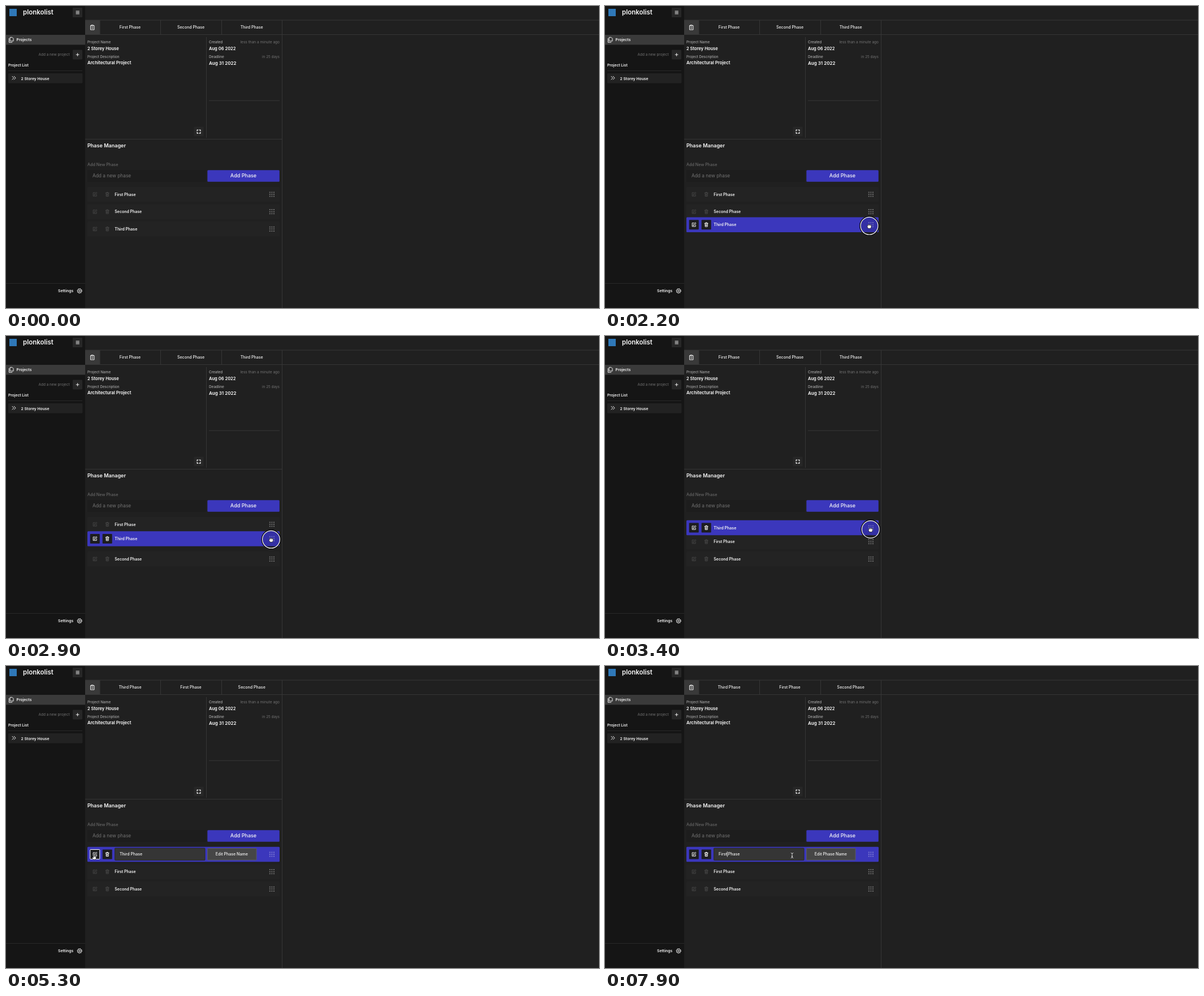
An HTML page that plays this animation: 1049 px wide and 534 px high, repeating every 8 s.

```html
<!DOCTYPE html>
<html lang="en">
<head>
<meta charset="utf-8">
<title>Phase manager</title>
<style>
  html, body { margin: 0; width: 100%; height: 100%; overflow: hidden; background: #202020; }
  svg { display: block; width: 1049px; height: 534px; }
  text { font: 500 7.05px Inter, "Open Sans", sans-serif; fill: #f6f6f6; white-space: pre; }
  .mid { text-anchor: middle; }
  .end { text-anchor: end; }
  .bold { font-weight: 600; }
  .label { font-size: 6.4px; fill: #a6a6a6; }
  .dim { font-size: 6.4px; font-weight: 400; fill: #727272; }
  .value { font-size: 7.55px; font-weight: 600; fill: #fff; }
  .side { font-size: 6.8px; font-weight: 600; }
  .line { fill: none; stroke: #363636; }
  .faint { fill: none; stroke: #292929; }
  .box { fill: #272727; }
  .icon { fill: none; stroke: currentColor; stroke-width: 1; stroke-linecap: round; stroke-linejoin: round; color: #eee; }
  .row .bg { fill: #232323; }
  .row .btn { fill: transparent; }
  .row .icon { color: #454545; }
  .row .grip { fill: none; stroke: #6a6a6a; stroke-width: 2; stroke-dasharray: 2 1.6; }
  .row.on .bg { fill: #3b37bc; }
  .row.on .btn { fill: #1d1d1f; }
  .row.on .icon { color: #f2f2f2; }
  .row.on .grip { stroke: #7774cf; }
  .cursor { fill: #fff; stroke: #111; stroke-width: .7; stroke-linejoin: round; }
</style>
</head>
<body>
<svg viewBox="0 0 1049 534">
  <defs>
    <g id="pencil">
      <path d="M0 -3H-3V3.2H3V.4"/>
      <path d="M-1.2 1.3L-.9 -.4L2.5 -3.7L3.8 -2.5L.5 .9Z"/>
    </g>
    <path id="trash" d="M-3 -2.4H3M-1.2 -2.4V-3.6H1.2V-2.4M-2.3 -2.2L-2 3.5H2L2.3 -2.2M-.7 -.6V2M.7 -.6V2"/>
    <path id="beam" d="M-2 -4.5Q0 -4.5 0 -3Q0 -4.5 2 -4.5M0 -3V3M-2 4.5Q0 4.5 0 3Q0 4.5 2 4.5M-1 1.5H1"/>
  </defs>

  <rect width="1049" height="534" fill="#202020"/>
  <rect width="140" height="534" fill="#151515"/>

  <!-- sidebar -->
  <rect x="6" y="5" width="13" height="13" fill="#2f78b8"/>
  <text x="30" y="15" style="font-size:11.5px;font-weight:600">plonkolist</text>
  <rect class="box" x="118" y="3" width="17" height="17" rx="1"/>
  <path class="icon" d="M124 9.2h5.4M124 11.5h5.4M124 13.8h5.4"/>
  <rect y="51" width="140" height="17.5" fill="#3a3a3a"/>
  <g class="icon">
    <path d="M7.6 55.4H11L13 57.4V62H7.6Z"/>
    <path d="M5.4 57.4V64.3H10.8"/>
  </g>
  <text class="side" x="18.5" y="62">Projects</text>
  <text class="dim end" x="112.5" y="88.3">Add a new project</text>
  <rect class="box" x="118" y="77.5" width="17" height="17" rx="1"/>
  <path class="icon" d="M124.2 86h4.8M126.6 83.6v4.8"/>
  <text class="side" x="4" y="107" style="font-size:6.65px">Project List</text>
  <path class="faint" d="M4 114.5H135M0 490.5H140"/>
  <rect x="4" y="119" width="131.5" height="17.5" rx="1" fill="#222"/>
  <path class="icon" d="M11 124.3l2.8 2.9l-2.8 2.9M14.3 124.3l2.8 2.9l-2.8 2.9"/>
  <text class="side" x="26.5" y="130.6">2 Storey House</text>
  <text class="side" x="92" y="506.2">Settings</text>
  <g class="icon">
    <circle cx="130.2" cy="503.8" r="3.5"/>
    <circle cx="130.2" cy="503.8" r="1.3"/>
    <circle cx="130.2" cy="503.8" r="4.2" stroke-dasharray="1.3 2" stroke-linecap="butt"/>
  </g>

  <!-- tabs and dividers -->
  <rect x="140" y="25" width="26" height="25.5" fill="#393939"/>
  <g class="icon">
    <path d="M151 34.5H149.5V42H156V34.5H154.5M151.3 33.7H154.2V35.3H151.3Z"/>
    <path d="M151.3 37.8h2.8M151.3 39.8h2.8" stroke-width=".8"/>
  </g>
  <path class="line" d="M140 25H1049M140 50.5H1049M166 25V50M273.5 25V50M381.5 25V50M488.5 25V534M140 235.5H488M354.5 55V233M359 167.3H484"/>
  <g id="tabs">
    <text class="mid" x="219.5" y="40.2"></text>
    <text class="mid" x="327" y="40.2"></text>
    <text class="mid" x="434.7" y="40.2"></text>
  </g>

  <!-- project details -->
  <text class="label" x="144" y="66.4">Project Name</text>
  <text class="value" x="144" y="77.5">2 Storey House</text>
  <text class="label" x="144" y="91.8" style="font-size:6.2px">Project Description</text>
  <text class="value" x="144" y="102.7" style="font-size:7.8px">Architectural Project</text>
  <text class="label" x="359" y="66.4">Created</text>
  <text class="dim end" x="484" y="66.4" style="font-size:6.55px">less than a minute ago</text>
  <text class="value" x="359" y="77.5">Aug 06 2022</text>
  <text class="label" x="359" y="91.8">Deadline</text>
  <text class="dim end" x="484" y="91.8">in 25 days</text>
  <text class="value" x="359" y="103.7" style="font-size:8px">Aug 31 2022</text>
  <rect class="box" x="332.5" y="213.5" width="17" height="17" rx="1"/>
  <path class="icon" stroke-linecap="butt" style="stroke-width:1.3" d="M338.1 220.9V219.2H339.8M342.2 219.2H343.9V220.9M343.9 223.3V225H342.2M339.8 225H338.1V223.3"/>

  <!-- phase form -->
  <text class="bold" x="144" y="249.6" style="font-size:9.05px">Phase Manager</text>
  <text x="144" y="283" style="font-size:7.2px;fill:#686868">Add New Phase</text>
  <rect x="144" y="290" width="210" height="21" rx="1" fill="#1d1d1d"/>
  <text x="153" y="302.9" style="font-size:8.35px;font-weight:400;fill:#727272">Add a new phase</text>
  <rect x="356.3" y="290.3" width="127.5" height="20.5" rx="1.5" fill="#3b37bc"/>
  <text class="mid" x="420" y="303.4" style="font-size:9px">Add Phase</text>

  <g id="rows"></g>

  <g id="editor">
    <rect x="192.5" y="322" width="159.5" height="21.5" rx="1" fill="#353535" stroke="#29292f"/>
    <rect x="356.5" y="322.5" width="86.5" height="20.5" rx="1" fill="#464646" stroke="#5b5b5b"/>
    <text class="mid" x="399.3" y="335.2">Edit Phase Name</text>
    <rect id="mark" x="201" y="328" height="9.5" fill="#5d96c9"/>
    <text id="field" x="201" y="335.2"></text>
    <rect id="caret" y="328" width=".8" height="9.5" fill="#fff"/>
  </g>

  <g id="pointer">
    <g id="ring" fill="none">
      <circle r="16.2" stroke="#0c0c10" stroke-width="2.4" fill="#000" fill-opacity=".12"/>
      <circle r="15.4" stroke="#fff" stroke-width="1.2"/>
    </g>
    <path class="cursor" data-kind="arrow" d="M0 0V9L2.2 7L3.7 10.3L5.1 9.7L3.6 6.5H6.4Z"/>
    <path class="cursor" data-kind="open" d="M-2 4.8L-4 1.2Q-4.3 .1 -3.2 .3L-2.3 1.2L-3 -2.2Q-2.4 -3.3 -1.7 -2.3L-1 -.6V-3.5Q-.3 -4.6 .4 -3.5L.6 -.6L1.3 -3Q2.2 -3.8 2.5 -2.7L2.2 0L3 -1.5Q4 -2 3.9 -.8L2.8 4.8Z"/>
    <path class="cursor" data-kind="grab" d="M-2 4.5L-3.7 1.5Q-4 0 -2.8 .3V-1.6Q-2 -2.8 -1.2 -1.9Q-.4 -3 .5 -1.9Q1.5 -2.8 2.1 -1.5Q3.4 -2 3.5 -.6V1.8L2.5 4.5ZM-1.2 -1.9V-.3M.5 -1.9V-.3M2.1 -1.5V-.3"/>
    <path class="cursor" data-kind="hand" d="M-1.5 5.2L-3.7 2Q-3.7 .7 -2.6 1.2L-1.5 2V-3Q-.8 -4.2 0 -3V0Q.8 -.7 1.3 .2Q2.1 -.4 2.6 .6Q3.6 .2 3.7 1.4L2.9 5.2Z"/>
    <g data-kind="beam" fill="none" stroke-linecap="round">
      <use href="#beam" stroke="#111" stroke-width="2"/>
      <use href="#beam" stroke="#fff" stroke-width=".9"/>
    </g>
  </g>
</svg>
<script>
const LOOP = 8000, STEP = 100;
const $ = id => document.getElementById(id);
const show = (el, on) => { el.style.display = on ? '' : 'none'; };
const within = (t, a, b) => t >= a && t < b;

// Linear value on a list of [time, ...values].
function track(points, t) {
  const i = points.findIndex(p => p[0] > t);
  if (i < 0) return points[points.length - 1].slice(1);
  if (i === 0) return points[0].slice(1);
  const a = points[i - 1], b = points[i];
  const k = (t - a[0]) / (b[0] - a[0]);
  return a.slice(1).map((v, j) => v + (b[j + 1] - v) * k);
}

// Latest entry of a list of [time, value].
const latest = (list, t) => list.filter(e => e[0] <= t).pop()[1];

const SLOTS = [333, 363.7, 394.3];
const rows = [
  { name: 'First Phase', y: [[3100, SLOTS[0]], [3300, SLOTS[1]]] },
  { name: 'Second Phase', y: [[2700, SLOTS[1]], [2900, SLOTS[2]]] },
  { name: 'Third Phase', y: [[1500, SLOTS[2]], [2000, 395], [2600, 370], [3400, 339], [3700, 336], [3800, SLOTS[0]]] }
];

const path = [
  [300, 118, 432], [500, 260, 400], [700, 470, 396], [900, 470, 430], [1100, 470, 430],
  [1300, 465, 406], [1500, 466, 397], [2000, 467, 398], [2600, 468.5, 370.5],
  [3400, 469.8, 342], [3800, 470, 336], [3900, 470, 336], [4300, 156, 337],
  [5500, 156, 337], [5800, 214, 331.5], [7700, 214, 331.5], [7800, 250, 334], [7900, 331, 335]
];
const kinds = [[0, ''], [300, 'arrow'], [1300, 'open'], [1500, 'grab'], [3800, 'open'],
  [4000, 'arrow'], [4300, 'hand'], [5700, 'beam']];
const typed = [[0, 'Third'], [7000, 'F'], [7200, 'Fi'], [7400, 'Fir'], [7500, 'Firs'], [7700, 'First']];

$('rows').innerHTML = rows.map(r => `
  <g class="row">
    <rect class="bg" x="144" y="-13.2" width="340" height="26.5" rx="1.5"/>
    <rect class="btn" x="148.8" y="-8.5" width="17" height="17" rx="1"/>
    <rect class="btn" x="170.7" y="-8.5" width="17" height="17" rx="1"/>
    <use class="icon" href="#pencil" x="157.2"/>
    <use class="icon" href="#trash" x="179.2"/>
    <text class="bold" x="192.3" y="2.6" style="font-size:6.95px">${r.name}</text>
    <path class="grip" d="M465.8 -3.6h9.2M465.8 0h9.2M465.8 3.6h9.2"/>
  </g>`).join('');

const rowEls = [...document.querySelectorAll('.row')];
const third = rowEls[2];
const editBtn = third.querySelector('.btn');
const tabEls = [...$('tabs').children];
const cursors = [...document.querySelectorAll('[data-kind]')];

function draw(t) {
  rows.forEach((r, i) => rowEls[i].setAttribute('transform', `translate(0 ${track(r.y, t)[0]})`));
  third.classList.toggle('on', within(t, 500, 800) || t >= 1400);

  const order = t < 3900 ? [0, 1, 2] : [2, 0, 1];
  tabEls.forEach((el, i) => { el.textContent = rows[order[i]].name; });

  const editing = t >= 4800;
  show($('editor'), editing);
  show(third.querySelector('text'), !editing);
  editBtn.style.stroke = within(t, 4300, 5600) ? '#fff' : 'none';
  if (editing) {
    const word = latest(typed, t), field = $('field');
    field.textContent = word + ' Phase';
    const width = field.getSubStringLength(0, word.length);
    $('mark').setAttribute('width', width);
    show($('mark'), within(t, 6300, 7000));
    $('caret').setAttribute('x', 201 + width);
    show($('caret'), t >= 7000);
  }

  const kind = latest(kinds, t);
  cursors.forEach(el => show(el, el.dataset.kind === kind));
  show($('ring'), within(t, 1500, 3800));
  $('pointer').setAttribute('transform', `translate(${track(path, t).join(' ')})`);
}

function tick() {
  const t = performance.now() % LOOP;
  draw(Math.floor(t / STEP) * STEP);
  requestAnimationFrame(tick);
}
tick();
</script>
</body>
</html>
```
